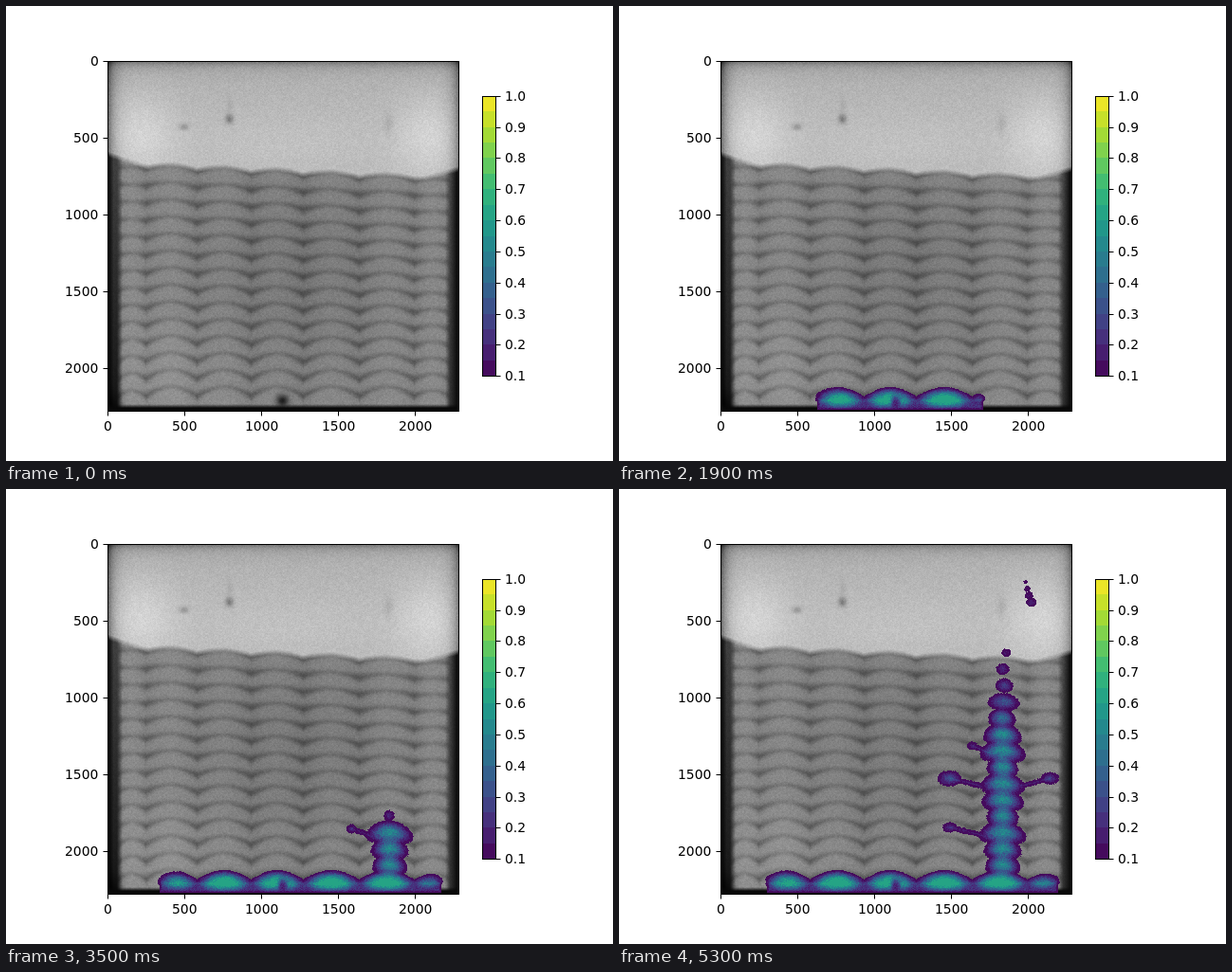
An HTML page with a canvas that plays this animation: 640 px wide and 480 px high, repeating every 5.4 s.

```html
<!DOCTYPE html>
<html lang="en">
<head>
<meta charset="utf-8">
<style>
  html, body { margin: 0; width: 100%; height: 100%; overflow: hidden; background: #fff; }
  canvas { display: block; width: 640px; height: 480px; }
</style>
</head>
<body>
<canvas id="stage" width="640" height="480"></canvas>
<script>
const ctx = document.getElementById('stage').getContext('2d');
const LOOP = 5400, STEP = 100;
const X0 = 108, Y0 = 58, W = 370, H = 370;

const clamp = (v, lo = 0, hi = 1) => Math.min(hi, Math.max(lo, v));
const ramp = (v, a, b) => clamp((v - a) / (b - a));
const mix = (a, b, k) => a + (b - a) * k;
const bump = (x, y, cx, cy, sx, sy = sx) => Math.exp(-(((x - cx) / sx) ** 2) - ((y - cy) / sy) ** 2);

// Repeatable noise in -0.5..0.5
function noise(x, y) {
  let h = Math.imul(x, 374761393) + Math.imul(y, 668265263);
  h = Math.imul(h ^ (h >>> 13), 1274126177);
  return ((h ^ (h >>> 16)) >>> 0) / 4294967296 - 0.5;
}

function keyed(t, times, values) {
  let i = 1;
  while (i < times.length - 1 && t > times[i]) i++;
  return mix(values[i - 1], values[i], ramp(t, times[i - 1], times[i]));
}

// Colour scale: 18 flat bands from 0.1 to 1.0
const STOPS = ['440154', '482878', '3e4989', '31688e', '26828e', '1f9e89', '35b779', '6ece58', 'b5de2b', 'fde725']
  .map(h => [0, 2, 4].map(i => parseInt(h.slice(i, i + 2), 16)));
const BANDS = Array.from({ length: 18 }, (_, i) => {
  const p = (i + 0.5) / 2, k = Math.min(8, Math.floor(p));
  return STOPS[k].map((c, j) => Math.round(mix(c, STOPS[k + 1][j], p - k)));
});

// Wavy layers: valleys split each layer into lobes
const VALLEYS = [118, 147, 201, 258, 313, 372, 430, 468];
const LAYERS = 13, BASE = 401;

function layerShape(x) {
  let i = 0;
  while (i < VALLEYS.length - 2 && x > VALLEYS[i + 1]) i++;
  const u = clamp(2 * (x - VALLEYS[i]) / (VALLEYS[i + 1] - VALLEYS[i]) - 1, -1, 1);
  const valley = Math.abs(u) ** 1.7;
  const side = i === 0 || i === VALLEYS.length - 2 ? 4 * (1 - valley) : 0;
  const top = Math.min(178, 167.5 + (x - 172) * 0.045) + 4.5 * valley + side;
  const bottom = BASE + 10 * valley + side;
  return { valley, top, bottom, pitch: (bottom - top) / LAYERS };
}
const COLUMNS = Array.from({ length: W }, (_, i) => layerShape(X0 + i));

function upperGray(x, y) {
  let g = 185 + 26 * bump(x, y, 140, 135, 38, 44) + 26 * bump(x, y, 448, 138, 38, 44);
  g += 8 * bump(x, y, 290, 145, 120, 30);
  g -= 55 * Math.exp(-(y - Y0) / 4) + 22 * Math.exp(-(y - Y0) / 22);
  g -= 85 * Math.exp(-(x - X0) / 6) + 85 * Math.exp(-(477 - x) / 6);
  g -= 60 * bump(x, y, 235, 119, 4.5, 5) + 45 * bump(x, y, 187, 127, 5, 3.5);
  return g - 12 * bump(x, y, 235, 105, 3, 10) - 18 * bump(x, y, 403, 124, 5, 12);
}

function lowerGray(x, y, s) {
  const q = (y - s.top) / s.pitch;
  const d = (q - Math.min(LAYERS, Math.round(q))) * s.pitch;
  let g = 140 - 16 * bump(x, y, 305, 275, 120, 130) + 8 * bump(x, y, 165, 390, 60);
  g -= (18 + 24 * s.valley) * Math.exp(-((d / (2.6 + 1.8 * s.valley)) ** 2)) + 8 * s.valley;
  g -= 105 * bump(x, y, 291, 416, 6.5);
  const depth = ramp(y, 165, 420);
  const left = mix(62, 22, depth) * ramp(x, 107, 113);
  const right = mix(58, 36, depth) * (1 - ramp(x, 468, 475)) + 12;
  g = mix(left, g, ramp(x, 116.5, 122.5));
  g = mix(g, right, ramp(x, 462.5, 468));
  g *= 1 - 0.75 * bump(x, y, 108, 424, 11, 16);
  return mix(g, 8, ramp(y, 419.5, 423.5));
}

function buildBackground() {
  const img = ctx.createImageData(W, H);
  for (let j = 0; j < H; j++) for (let i = 0; i < W; i++) {
    const x = X0 + i, y = Y0 + j, s = COLUMNS[i];
    const surface = Math.min(s.top, 157 + 0.33 * (x - 108), 185 - 0.27 * (x - 430));
    const g = mix(upperGray(x, y), lowerGray(x, y, s), ramp(y, surface - 4, surface + 2));
    const grain = noise(x, y) * 12 + noise(x >> 1, y >> 1) * 8;
    const v = clamp(g + grain * clamp(g / 110), 0, 255);
    img.data.set([v, v, v, 255], (j * W + i) * 4);
  }
  return img;
}

const field = new Float32Array(W * H);

function addField(x1, y1, x2, y2, depthAt) {
  const xa = Math.max(X0, Math.floor(x1)), xb = Math.min(X0 + W - 2, Math.ceil(x2));
  const ya = Math.max(Y0, Math.floor(y1)), yb = Math.min(Y0 + H - 2, Math.ceil(y2));
  for (let y = ya; y <= yb; y++) for (let x = xa; x <= xb; x++) {
    const d = depthAt(x, y, COLUMNS[x - X0]);
    if (d > 0) {
      const k = (y - Y0) * W + x - X0;
      field[k] = Math.hypot(field[k], d);
    }
  }
}

const dome = (dx, dy, rx, ry) => (1 - (dx / rx) ** 2 - (dy / ry) ** 2) * Math.min(rx, ry) * 0.47;

function addOval(cx, cy, rx, ry, droop = 0) {
  addField(cx - rx, cy - ry, cx + rx, cy + ry + droop,
    (x, y, s) => dome(x - cx, y - cy - droop * s.valley, rx, ry));
}

function addLink(ax, ay, bx, by, r) {
  const dx = bx - ax, dy = by - ay, len = dx * dx + dy * dy;
  addField(Math.min(ax, bx) - r, Math.min(ay, by) - r, Math.max(ax, bx) + r, Math.max(ay, by) + r, (x, y) => {
    const k = clamp(((x - ax) * dx + (y - ay) * dy) / len);
    return 0.8 * (r - Math.hypot(x - ax - k * dx, y - ay - k * dy));
  });
}

// Bottom layer: a front spreads both ways and fills one lobe after another
function addFlood(t) {
  const times = [0, 600, 1100, 1900, 2900, 4100];
  const left = keyed(t, times, [286, 240, 221, 208, 167, 155]);
  const right = keyed(t, times, [286, 352, 368, 384, 455, 463]);
  const top = mix(418, 412, ramp(t, 1100, 1900));
  addField(left, top, right, 426, (x, y, s) =>
    Math.min(x - left, right - x, 426 - y, y - Math.max(top, s.bottom), 3.2));
  for (let i = 0; i < VALLEYS.length - 1; i++) {
    const x1 = Math.max(left, VALLEYS[i]), x2 = Math.min(right, VALLEYS[i + 1]);
    if (x2 - x1 < 3) continue;
    const cx = (x1 + x2) / 2, cy = 413.5, a = (x2 - x1) / 2 + 2, b = Math.min(14, 2 + 0.4 * a);
    addField(cx - a, cy - b, cx + a, 425, (x, y, s) => {
      const e = dome(x - cx, y - cy, a, b), up = y - s.bottom, down = 426 - y;
      return Math.min(e, up, down) > 0 ? 1.4 / Math.sqrt(e ** -2 + up ** -2 + down ** -2) : 0;
    });
  }
}

// Side arms of the column: layer, reach, head size
const ARMS = [[3, -56, 8], [6, -56, 13], [6, 50, 10], [8, -32, 6]];
const COLUMN_X = 404;
const layerY = n => 413 - 17.2 * n;

// A column climbs layer by layer; its tip thins out at the end
function addColumn(t) {
  const front = keyed(t, [2900, 3600, 4100, 4800, 5300], [413, 326, 319, 276, 152]);
  const span = mix(22, 110, ramp(t, 4800, 5300));
  for (let n = 1; n < 15; n++) {
    const cy = layerY(n), g = ramp(front, cy + 2, cy + 2 - span);
    if (g < 0.12) continue;
    const width = 21.5 + 4.5 * Math.cos(2 * Math.PI * (n - 2.8) / 2.75);
    addOval(COLUMN_X + noise(n, 3) * 10 * (1 - g), cy, width * g, 13 * mix(0.2, 1, g), 6 * g);
  }
  for (const [n, reach, head] of ARMS) {
    const y = layerY(n), g = ramp(front, y, y - 32);
    if (!g) continue;
    const hx = COLUMN_X + reach * g, hy = y - 5 * g;
    addLink(COLUMN_X + 0.4 * reach, y + 3, hx, hy, 3.2);
    addOval(hx, hy, head * g, mix(4, 0.6 * head + 1, g));
  }
}

function addStrays(t) {
  const g = ramp(t, 5050, 5300);
  for (let i = 0; g && i < 4; i++) addOval(428 + 2 * i, 98 + 7 * i, (2.5 + i) * g, 2.5 + i);
}

function paintField(img) {
  for (let k = 0; k < field.length; k++) {
    if (!field[k]) continue;
    const x = X0 + k % W, y = Y0 + Math.floor(k / W);
    const d = field[k] + noise(x + 91, y + 17) * 1.1 - 4.5 * bump(x, y, 291, 417, 5, 6);
    if (d < 0.2 && field[k] < 1.5) continue;
    const v = Math.min(0.63, 0.1 + 0.0113 * Math.max(0, d) ** 2);
    img.data.set(BANDS[Math.floor((v - 0.1) / 0.05)], k * 4);
  }
}

function line(x1, y1, x2, y2) {
  ctx.beginPath();
  ctx.moveTo(x1, y1);
  ctx.lineTo(x2, y2);
  ctx.stroke();
}

// align: 0 starts at x, 0.5 is centred, 1 ends at x
function label(text, x, y, align) {
  ctx.fillText(text, Math.round(x - ctx.measureText(text).width * align), y);
}

function drawAxes() {
  ctx.strokeStyle = ctx.fillStyle = '#000';
  ctx.lineWidth = 1;
  ctx.font = '13.89px "DejaVu Sans", sans-serif';
  ctx.strokeRect(107.5, 58.5, 370, 369);
  for (let n = 0; n <= 2000; n += 500) {
    const x = Math.round(107.3 + n * 0.162), y = Math.round(57.7 + n * 0.162);
    line(x + 0.5, 428, x + 0.5, 432.5);
    line(102.5, y + 0.5, 107, y + 0.5);
    label(n, 107.3 + n * 0.162, 448, 0.5);
    label(n, 97.6, y + 5, 1);
  }
}

function drawScale() {
  const x = 502, top = 94.7, height = 295.6;
  const yAt = k => Math.round(top + height * (1 - k));
  BANDS.forEach((c, i) => {
    ctx.fillStyle = `rgb(${c})`;
    ctx.fillRect(x, yAt((i + 1) / 18), 15, yAt(i / 18) - yAt((i + 1) / 18));
  });
  ctx.fillStyle = '#000';
  ctx.strokeRect(x + 0.5, 95.5, 14, 295);
  for (let i = 1; i <= 10; i++) {
    const y = yAt((i - 1) / 9);
    line(517, y + 0.5, 521.5, y + 0.5);
    label((i / 10).toFixed(1), 526, y + 5, 0);
  }
}

const background = buildBackground();
const picture = ctx.createImageData(W, H);

function draw(t) {
  field.fill(0);
  if (t > 0) {
    addFlood(t);
    addColumn(t);
    addStrays(t);
  }
  picture.data.set(background.data);
  paintField(picture);
  ctx.fillStyle = '#fff';
  ctx.fillRect(0, 0, 640, 480);
  ctx.putImageData(picture, X0, Y0);
  drawAxes();
  drawScale();
}

let shown = -1;
function tick() {
  const t = Math.floor(performance.now() % LOOP / STEP) * STEP;
  if (t !== shown) draw(shown = t);
  requestAnimationFrame(tick);
}
tick();
</script>
</body>
</html>
```
